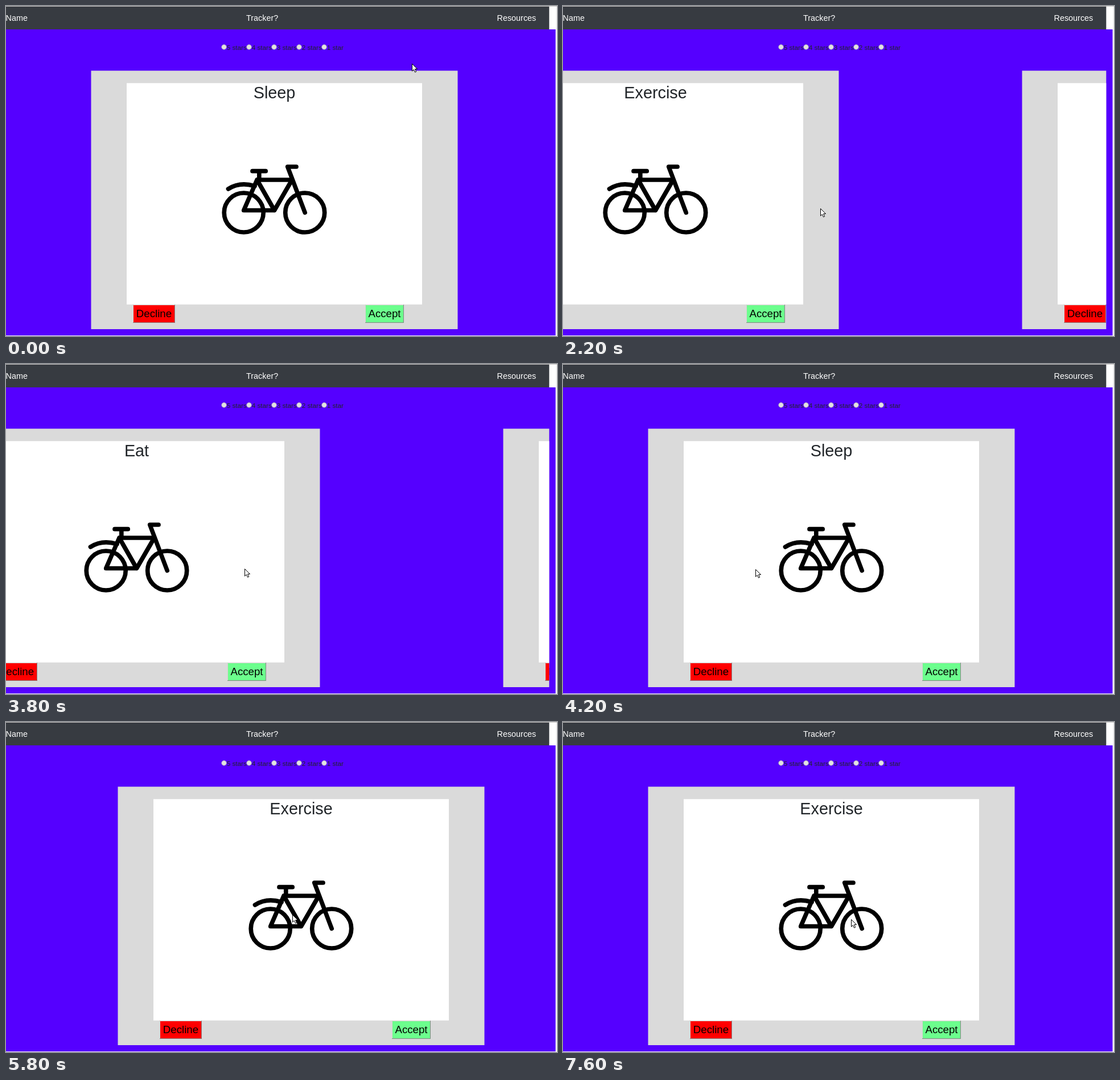
An HTML page for the animation above (8 s loop, 968 by 579 pixels).

```html
<!DOCTYPE html>
<html lang="en">
<head>
<meta charset="utf-8">
<title>Swipe cards</title>
<style>
html, body { margin: 0; width: 100%; height: 100%; overflow: hidden; background: #fff; }
svg { display: block; width: 100%; height: 100%; font-family: "Liberation Sans", Arial, sans-serif; }
</style>
</head>
<body>
<svg viewBox="0 0 968 579">
  <defs>
    <clipPath id="view"><rect y="100" width="954.3" height="479"/></clipPath>
    <g id="card">
      <rect x="149.5" y="113.5" width="644" height="453.5" fill="#dadada"/>
      <rect x="212" y="135.3" width="519" height="388.4" fill="#fff"/>
      <g fill="none" stroke="#000" stroke-width="7.7" stroke-linecap="round" stroke-linejoin="round">
        <circle cx="417.7" cy="362.5" r="34.5"/>
        <circle cx="525.2" cy="362.5" r="34.5"/>
        <path d="M441 305H502.5L471.5 358.5H417.7L441 305L471.5 358.5"/>
        <path d="M433 289.7H456.2M444.8 290V305M510 282H494.7L525.2 362.5"/>
        <path d="M390.5 321Q411 308 437 316"/>
      </g>
      <g id="buttons" font-size="18.7"></g>
    </g>
  </defs>
  <rect width="968" height="579" fill="#f2f2f2"/>
  <rect y="1" width="966" height="41" fill="#fff"/>
  <rect y="41" width="965.5" height="537" fill="#50f"/>
  <rect width="968" height="1" fill="#c9c7c5"/>
  <rect y="1" width="954.3" height="40" fill="#373b41"/>
  <g fill="#fff" font-size="14.4">
    <text x="-0.5" y="26">Name</text>
    <text x="422" y="26">Tracker?</text>
    <text x="862.5" y="26">Resources</text>
  </g>
  <g id="stars" font-size="11.7" fill="#212529"></g>
  <g id="track" clip-path="url(#view)"></g>
  <path id="cursor" d="M.5 .5V13.2L3.4 10.5L5.5 15.2L7.7 14.2L5.6 9.6H9.6Z" fill="#fff" stroke="#000"/>
</svg>
<script>
const LOOP = 8000, STEP = 100, PITCH = 966, SETTLE = 300;
const titles = ['Sleep', 'Exercise', 'Eat', 'Sleep', 'Exercise', 'Exercise'];

// Each swipe: start time, drag duration, pointer from, pointer to
const swipes = [
  { at: 400,  drag: 200, from: [742, 343], to: [442, 347] },
  { at: 2000, drag: 200, from: [761, 352], to: [452, 355] },
  { at: 3600, drag: 300, from: [661, 356], to: [338, 360] },
  { at: 5200, drag: 400, from: [838, 337], to: [503, 338] },
  { at: 6900, drag: 400, from: [852, 337], to: [506, 346] }
];

const $ = id => document.getElementById(id);
const clamp = v => Math.min(1, Math.max(0, v));
const mix = (a, b, p) => a + (b - a) * p;
const swing = p => (1 - Math.cos(Math.PI * p)) / 2;

// CSS "ease": cubic-bezier(.25, .1, .25, 1)
function ease(x) {
  let lo = 0, hi = 1;
  for (let i = 0; i < 24; i++) {
    const s = (lo + hi) / 2, q = 1 - s;
    if (0.75 * s * q * q + 0.75 * s * s * q + s ** 3 < x) lo = s; else hi = s;
  }
  const q = 1 - lo;
  return 0.3 * lo * q * q + 3 * lo * lo * q + lo ** 3;
}

const button = (x, w, fill, label) => `
  <rect x="${x}" y="524" width="${w}" height="32" fill="${fill}"/>
  <path d="M${x + 0.5} 556V524.5H${x + w}" fill="none" stroke="#d6d3d0"/>
  <path d="M${x} 555.5H${x + w - 0.5}V524" fill="none" stroke="#858585"/>
  <text x="${x + w / 2}" y="546" text-anchor="middle">${label}</text>`;

$('buttons').innerHTML =
  button(223, 74, '#f00', 'Decline') + button(631, 68, '#6cff8d', 'Accept');

$('stars').innerHTML = [5, 4, 3, 2, 1].map((n, i) => `
  <text x="${387.7 + 44 * i}" y="77">${n} star${n > 1 ? 's' : ''}</text>
  <circle cx="${383 + 44 * i}" cy="72" r="4.3" fill="#e3e3e3" stroke="#a09ab0" stroke-width=".8"/>`).join('');

$('track').innerHTML = '<g id="strip">' + titles.map((title, i) => `
  <g transform="translate(${i * PITCH})">
    <use href="#card"/>
    <text x="471.5" y="162.3" font-size="28.8" fill="#212529" text-anchor="middle">${title}</text>
  </g>`).join('') + '</g>';

function draw(time) {
  const t = Math.floor(time / STEP) * STEP;
  let offset = 0, x = 713, y = 101;
  swipes.forEach(({ at, drag, from, to }, i) => {
    if (t < at) return;
    const p = swing(clamp((t - at) / drag));
    x = mix(from[0], to[0], p);
    y = mix(from[1], to[1], p);
    const settle = ease(clamp((t - at - drag) / SETTLE));
    offset = i * PITCH + mix(from[0] - x, PITCH, settle);
  });
  $('strip').setAttribute('transform', `translate(${-Math.round(offset)})`);
  $('cursor').setAttribute('transform', `translate(${Math.round(x)} ${Math.round(y)})`);
}

const start = performance.now();
function tick() {
  draw((performance.now() - start) % LOOP);
  requestAnimationFrame(tick);
}
tick();
</script>
</body>
</html>
```
